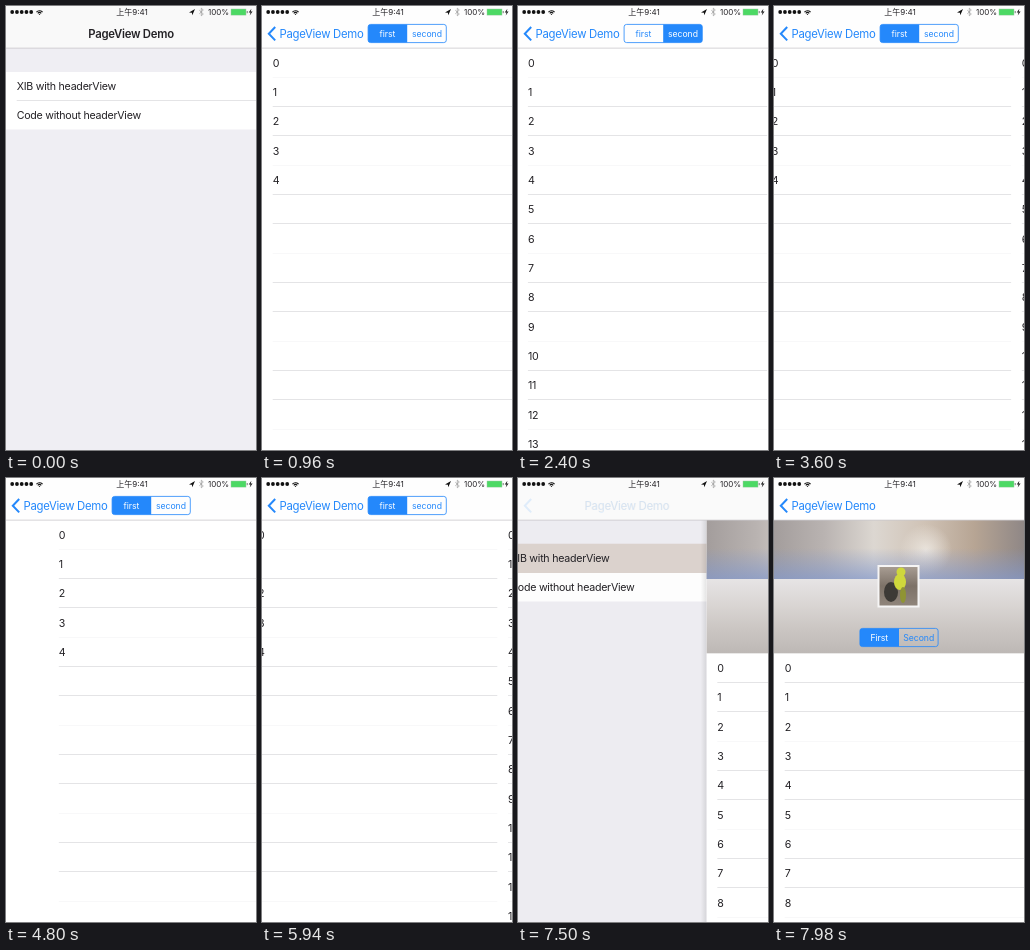
An HTML page with a canvas for the animation above (8000 ms loop, 250 by 444 pixels).

```html
<!DOCTYPE html>
<html lang="en">
<head>
<meta charset="utf-8">
<title>Page view demo</title>
<style>
  html, body { margin: 0; width: 100%; height: 100%; overflow: hidden; background: #fff; }
  canvas { display: block; width: 250px; height: 444px; }
</style>
</head>
<body>
<canvas id="stage"></canvas>
<script>
const W = 250, H = 444, LOOP = 8000;
const NAV = 42, ROW = 88 / 3, HEADER_END = 175.33, INSET = 10.7;
const BLUE = '#2488fb', INK = '#242226', RULE = '#e4e4e6', FAINT_RULE = '#f8f8f9';

const canvas = document.getElementById('stage');
const ctx = canvas.getContext('2d');
const ratio = window.devicePixelRatio || 1;
canvas.width = W * ratio;
canvas.height = H * ratio;

// Motion

const phase = (t, from, to) => Math.min(1, Math.max(0, (t - from) / (to - from)));

function ease(t, from, to) {
  const u = phase(t, from, to);
  return u * u * (3 - 2 * u);
}

const pull = (t, from, to) => Math.sin(Math.PI * phase(t, from, to));

// Critically damped push transition.
function push(t, from) {
  const k = Math.max(0, t - from) * 0.0155;
  return Math.min(1, 1.005 * (1 - Math.exp(-k) * (1 + k)));
}

// 0 shows the first list, W the second; pulls go past either end.
function scrollAt(t) {
  const page = ease(t, 980, 1600) - ease(t, 2980, 3700) + ease(t, 5080, 5440) - ease(t, 5600, 6000);
  return W * page + 45 * pull(t, 1700, 2405) - 100 * pull(t, 4060, 4920);
}

// Drawing helpers

function rect(x, y, w, h, color) {
  ctx.fillStyle = color;
  ctx.fillRect(x, y, w, h);
}

function ellipse(x, y, rx, ry, color) {
  ctx.fillStyle = color;
  ctx.beginPath();
  ctx.ellipse(x, y, rx, ry, 0, 0, Math.PI * 2);
  ctx.fill();
}

function path(points) {
  ctx.beginPath();
  points.forEach(([x, y]) => ctx.lineTo(x, y));
}

function line(points, color, width) {
  path(points);
  ctx.strokeStyle = color;
  ctx.lineWidth = width;
  ctx.stroke();
}

function polygon(points, color) {
  path(points);
  ctx.fillStyle = color;
  ctx.fill();
}

function text(str, x, y, { size = 10.67, weight = 400, color = INK, align = 'left', spacing = -0.26 } = {}) {
  ctx.font = `${weight} ${size}px Inter, "Noto Sans CJK SC", "Noto Sans CJK", sans-serif`;
  ctx.letterSpacing = spacing + 'px';
  ctx.textAlign = align;
  ctx.fillStyle = color;
  ctx.fillText(str, x, y + size * 0.364);
}

function layer(alpha, x, draw) {
  if (alpha <= 0.01) return;
  ctx.save();
  ctx.globalAlpha = alpha;
  ctx.translate(x, 0);
  draw();
  ctx.restore();
}

function gradient(x0, y0, x1, y1, colors) {
  const g = ctx.createLinearGradient(x0, y0, x1, y1);
  colors.forEach((color, i) => g.addColorStop(i / (colors.length - 1), color));
  return g;
}

// Parts

function segments(x, y, labels, selected) {
  const w = 79, h = 19, half = w / 2;
  const outline = new Path2D();
  outline.roundRect(x + 0.4, y + 0.4, w - 0.8, h - 0.8, 2.5);
  ctx.save();
  ctx.clip(outline);
  rect(x + selected * half, y, half, h, BLUE);
  ctx.restore();
  ctx.strokeStyle = BLUE;
  ctx.lineWidth = 0.8;
  ctx.stroke(outline);
  labels.forEach((label, i) => text(label, x + half * (i + 0.5), y + h / 2, {
    size: 8.67, align: 'center', spacing: -0.05, color: i === selected ? '#fff' : BLUE
  }));
}

function rows(top, count) {
  for (let i = 0; top + i * ROW < H; i++) {
    const bottom = top + (i + 1) * ROW;
    const faint = Math.abs(bottom % 1 - 0.33) < 0.1;
    rect(INSET, Math.ceil(bottom - 0.05) - 1, W - INSET, 1, faint ? FAINT_RULE : RULE);
    if (i < count) text(String(i), INSET, top + (i + 0.5) * ROW);
  }
}

function menu(highlights) {
  rect(0, 0, 2 * W, H, '#efeef3');
  rect(0, 66, W, 57.5, '#fff');
  rect(INSET, 94, W, 1, RULE);
  ['XIB with headerView', 'Code without headerView'].forEach((label, i) => {
    layer(highlights[i], 0, () => rect(0, 65.7 + i * 29, W, 29.3, '#ddd4cf'));
    text(label, INSET, 79.7 + i * ROW);
  });
}

function pager(scroll) {
  rect(0, 0, W, H, '#fff');
  [5, 20].forEach((count, i) => layer(1, i * W - scroll, () => rows(NAV, count)));
}

function photo() {
  const horizon = 101;
  rect(0, NAV, W, horizon - NAV, gradient(0, 0, W, 0,
    ['#a39d9c', '#b9b3b1', '#dcd7d1', '#d0c3b6', '#b7a594', '#8f8786']));
  const glow = ctx.createRadialGradient(152, 72, 0, 152, 72, 26);
  glow.addColorStop(0, 'rgba(240,236,230,0.8)');
  glow.addColorStop(1, 'rgba(240,236,230,0)');
  rect(126, 46, 52, horizon - 46, glow);
  rect(0, 70, W, horizon - 70, gradient(0, 70, 0, horizon, ['rgba(130,152,204,0)', 'rgba(130,152,204,0.7)']));
  rect(0, horizon, W, HEADER_END - horizon, gradient(0, horizon, 0, HEADER_END,
    ['#e6e4e5', '#dad6d4', '#cbc6c3', '#bdb8b5']));
}

function avatar() {
  rect(103.5, 87, 42, 42.5, '#f6f5f5');
  rect(105.5, 89, 38, 38.5, gradient(0, 89, 0, 127, ['#a79c92', '#7d7268', '#8f847a']));
  ellipse(117, 114, 7, 10, '#3d3a36');
  ellipse(127, 94, 4.5, 4.5, '#cfd83c');
  ellipse(126, 104, 6, 8, '#cfd83c');
  ellipse(129, 117, 3, 8, '#8f9434');
}

function headerPage() {
  rect(0, 0, W, H, '#fff');
  photo();
  avatar();
  segments(85.5, 150, ['First', 'Second'], 0);
  rows(HEADER_END, 20);
}

function statusBar() {
  for (let i = 0; i < 5; i++) ellipse(6.2 + i * 4.75, 6, 1.9, 1.9, '#111');
  ctx.strokeStyle = '#111';
  ctx.lineWidth = 1.1;
  for (let r = 0.6; r < 6; r += 1.8) {
    ctx.beginPath();
    ctx.arc(33.5, 9, r, -Math.PI * 0.76, -Math.PI * 0.24);
    ctx.stroke();
  }
  text('上午9:41', 126, 6, { size: 8, align: 'center', spacing: 0 });
  polygon([[183, 6.5], [189, 3], [186.3, 9.3], [185.9, 6.7]], '#111');
  line([[193.3, 4.2], [197.3, 8], [195.3, 9.8], [195.3, 2.2], [197.3, 4], [193.3, 7.8]], '#999', 0.7);
  text('100%', 202, 6, { size: 8, spacing: 0 });
  rect(224.8, 2.8, 15.4, 6.6, '#8fc99a');
  rect(225.3, 3.3, 14.4, 5.6, '#4cd964');
  rect(240.7, 5, 1, 2.2, '#777');
  polygon([[245.4, 2.8], [242.7, 6.6], [244.5, 6.6], [243.7, 9.4], [246.6, 5.4], [244.8, 5.4]], '#222');
}

function navBar(cover, popping, hasSegments, selected) {
  const shade = 249 + 5 * cover;
  rect(0, 0, W, NAV, `rgb(${shade},${shade},${shade})`);
  rect(0, NAV - 0.3, W, 0.8, '#c9c8cb');
  const dark = Math.pow(1 - cover, popping ? 1.6 : 11);
  const blue = popping ? 2 * cover - 1 : Math.pow(cover, 1.5);
  const title = { size: 11.33, align: 'center' };
  const titleX = 125 - 65.5 * cover;
  layer(dark, titleX, () => text('PageView Demo', 0, 27.7, { ...title, weight: 600 }));
  layer(blue, 0, () => {
    text('PageView Demo', titleX, 27.7, { ...title, color: BLUE });
    line([[13.2, 21], [6.8, 27.7], [13.2, 34.4]], BLUE, 2);
  });
  if (hasSegments) {
    layer(cover, 163 * (1 - cover), () => segments(105.7, 18, ['first', 'second'], selected));
  }
}

function draw(t) {
  const second = t >= 6900;
  const popping = t >= 6100 && !second;
  const cover = second ? push(t, 7440)
    : popping ? 1 - Math.pow(phase(t, 6180, 6840), 2.36)
    : push(t, 240);
  const scroll = scrollAt(t);
  const pageX = W * (1 - cover);

  ctx.setTransform(ratio, 0, 0, ratio, 0, 0);
  const highlights = [phase(t, 7010, 7080), phase(t, 40, 80) - phase(t, 6660, 6840)];
  layer(1, -75 * cover, () => menu(highlights));
  rect(0, 0, W, H, `rgba(0,0,0,${0.1 * cover * cover})`);
  if (cover > 0) {
    rect(pageX - 6, NAV, 6, H, gradient(pageX - 6, 0, pageX, 0, ['rgba(0,0,0,0)', 'rgba(0,0,0,0.1)']));
    layer(1, pageX, () => second ? headerPage() : pager(scroll));
  }
  navBar(cover, popping, !second, scroll > W / 2 ? 1 : 0);
  statusBar();
}

const start = performance.now();
function tick() {
  draw((performance.now() - start) % LOOP);
  requestAnimationFrame(tick);
}
tick();
</script>
</body>
</html>
```
